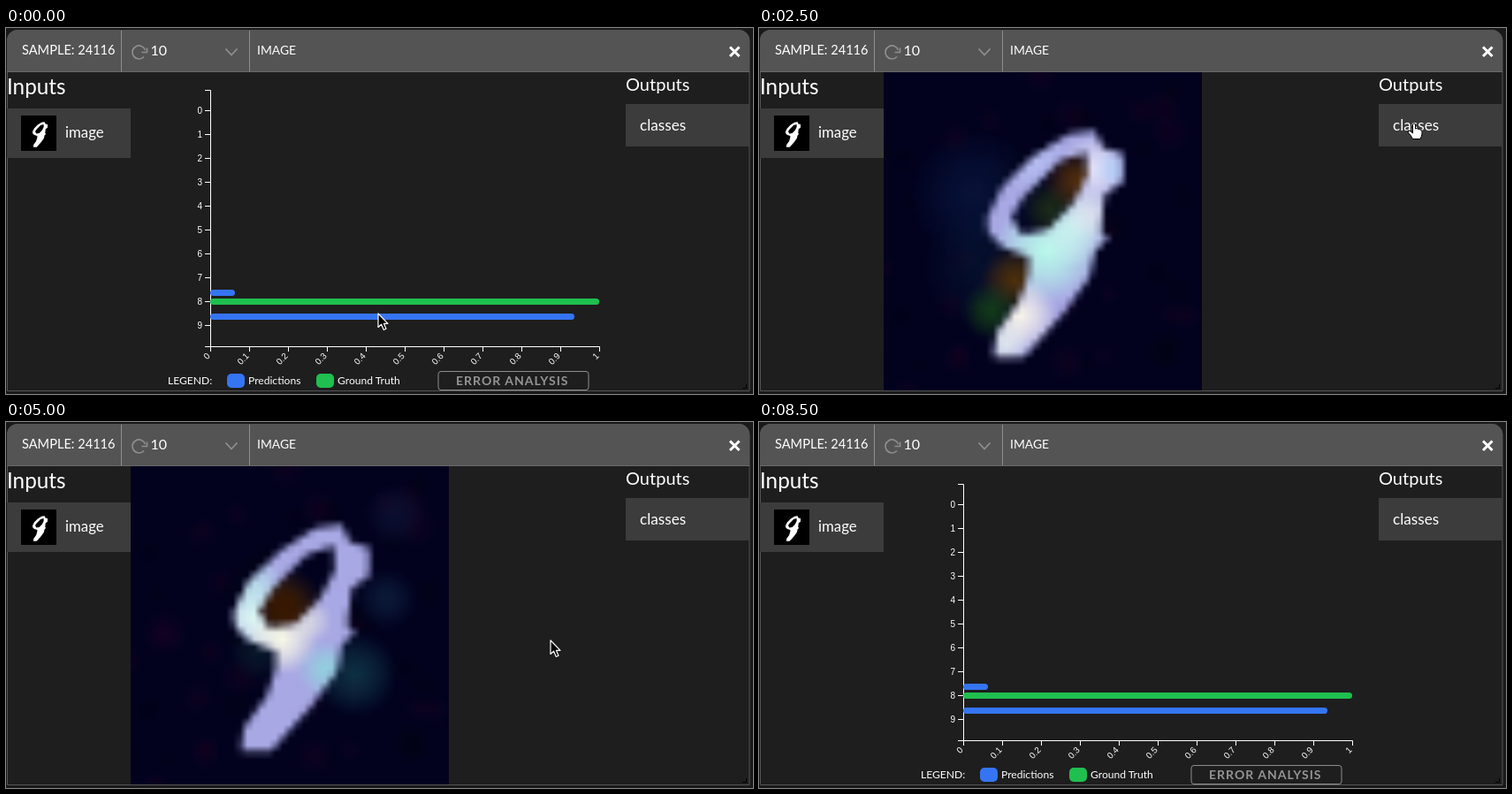
Write an HTML page with a canvas that moves like this. It is 845 px wide and 414 px high and loops after 8.76 s.

```html
<!DOCTYPE html>
<html lang="en">
<head>
<meta charset="utf-8">
<title>Sample analysis</title>
<style>
  html, body { margin: 0; width: 100%; height: 100%; overflow: hidden; background: #191919; }
  svg { position: absolute; left: 0; top: 0; font-family: Lato, sans-serif; fill: #fff; }
  canvas { position: absolute; left: 141px; top: 50px; width: 360px; height: 360px; visibility: hidden; }
  .axis { font: 10px "Liberation Sans", Arial, sans-serif; }
  .line { fill: none; stroke: #fff; }
  .grey { fill: none; stroke: #8e8e8e; }
</style>
</head>
<body>
<svg width="845" height="414">
  <path d="M1.5 410.5V14a12 12 0 0 1 12-11.500H829a12 12 0 0 1 12 11.500V410.500Z" fill="#1e1e1e" stroke="#555"/>
  <path d="M1 49V14A12 12 0 0 1 13 2H829A12 12 0 0 1 841 14V49Z" fill="#545454"/>
  <path d="M1 49.500H841" stroke="#686868"/>
  <path d="M130.500 3V49M275.500 3V49" stroke="#8e8e8e"/>
  <text x="18" y="30" font-size="14.600">SAMPLE: 24116</text>
  <path class="grey" stroke-width="1.700" d="M156 32.500A7.500 7.500 0 1 1 157.500 25M159.500 22.500V27.500H153.500"/>
  <text x="163.500" y="31" font-size="16">10</text>
  <path class="grey" stroke-width="1.800" d="M248.500 23.500L255 30.500L261.500 23.500"/>
  <text x="284" y="30" font-size="13.900">IMAGE</text>
  <path class="line" stroke-width="3" d="M819 21.500L829.500 32M829.500 21.500L819 32"/>

  <text x="1" y="75" font-size="24.300">Inputs</text>
  <rect x="1" y="91" width="140" height="56" fill="#3c3c3c"/>
  <rect x="17" y="99" width="40" height="40" fill="#000"/>
  <svg x="17" y="99" width="40" height="40" viewBox="141 50 360 360">
    <path id="digit" fill-rule="evenodd"/>
  </svg>
  <text x="67" y="124" font-size="16.800">image</text>

  <text x="701" y="71" font-size="20">Outputs</text>
  <clipPath id="button"><rect x="701" y="86" width="140" height="48"/></clipPath>
  <g clip-path="url(#button)">
    <rect x="701" y="86" width="140" height="48" fill="#3c3c3c"/>
    <circle id="ripple"/>
  </g>
  <text x="717" y="115.500" font-size="17.200">classes</text>
  <path d="M833 407.500H837.500V403" fill="none" stroke="#000"/>

  <g id="chart">
    <path class="line" d="M225 70.500H231.500V360.500H225M231.500 366V360.500H671.500V366"/>
    <g id="ticks" class="axis"></g>
    <g fill="#3575f3">
      <rect x="231" y="296" width="28" height="7" rx="3.500"/>
      <rect x="231" y="323" width="412" height="7" rx="3.500"/>
      <rect x="250" y="391" width="20" height="16" rx="5"/>
    </g>
    <g fill="#1fbf50">
      <rect x="231" y="306" width="440" height="7" rx="3.500"/>
      <rect x="351" y="391" width="20" height="16" rx="5"/>
    </g>
    <g font-size="12.100">
      <text x="183" y="403">LEGEND:</text>
      <text x="274" y="403">Predictions</text>
      <text x="375" y="403">Ground Truth</text>
    </g>
    <rect class="grey" x="489" y="388.500" width="170" height="21" rx="3"/>
    <text x="509" y="404" font-size="14" font-weight="700" letter-spacing="1" fill="#949494">ERROR ANALYSIS</text>
  </g>
</svg>
<canvas id="heatA" width="45" height="45"></canvas>
<canvas id="heatB" width="45" height="45"></canvas>
<svg width="845" height="414">
  <g id="cursor" stroke-linejoin="round">
    <path id="arrow" fill="#000" stroke="#fff" stroke-width="1.200" d="M0 0V15.500L3.600 12.200L6.300 18.500L9 17.300L6.400 11.300H11Z"/>
    <path id="hand" fill="#fff" stroke="#000" d="M-1.500 8V1Q0-1.500 1.500 1V6Q3.500 4.500 4.500 6.500Q6.500 5.500 7.200 7.500Q9 7 9 9.500V12Q8.500 14.500 7 17.500H-1.500Q-3-15 -1.500 17.500Q-3 14-6.500 10.500Q-7.500 8-5 8L-1.500 11Z"/>
  </g>
</svg>
<script>
const el = id => document.getElementById(id);
const show = (node, on) => node.style.visibility = on ? 'visible' : 'hidden';
const LOOP = 8760;

const DIGIT = 'M258 215L275 180L310 145L350 119L380 115L389 135L411 141V174L391 188L386 230L395 237' +
  'L380 252L374 282L345 322L300 371L266 372L269 346L295 310L306 275V257L276 247L260 232Z' +
  'M285 213L300 190L340 150L371 139L372 168L355 200L327 229L297 234Z';
el('digit').setAttribute('d', DIGIT);
el('hand').setAttribute('d', 'M-1.500 9V1Q0-1.500 1.500 1V6Q3.500 4.500 4.500 6.500Q6.500 5.500 7.200 7.500' +
  'Q9 7 9 9.500V12Q8.500 14.500 7 17.500H-1.500Q-3 14-6.500 10.500Q-7.500 8-5 8L-1.500 11Z');

let ticks = '';
for (let i = 0; i <= 10; i++) {
  const x = 231.5 + 44 * i, y = 93.5 + 27 * i;
  if (i < 10) ticks += `<path class="line" d="M225 ${y}H231"/><text x="222" y="${y + 3.5}" text-anchor="end">${i}</text>`;
  ticks += `<path class="line" d="M${x} 361V366"/>
    <text transform="translate(${x} 371.6) rotate(-45)" text-anchor="end">${i / 10}</text>`;
}
el('ticks').innerHTML = ticks;

// Each blob is [x, y, radius, "r,g,b", alpha] in stage coordinates.
function drawHeat(id, outside, inside) {
  const ctx = el(id).getContext('2d');
  const blob = ([x, y, r, rgb, alpha]) => {
    const g = ctx.createRadialGradient(x, y, 0, x, y, r);
    g.addColorStop(0, `rgba(${rgb},${alpha})`);
    g.addColorStop(0.5, `rgba(${rgb},${alpha * 0.6})`);
    g.addColorStop(1, `rgba(${rgb},0)`);
    ctx.fillStyle = g;
    ctx.fillRect(x - r, y - r, 2 * r, 2 * r);
  };
  let seed = 7;
  const random = () => (seed = seed * 16807 % 2147483647) / 2147483647;
  ctx.scale(1 / 8, 1 / 8);
  ctx.translate(-141, -50);
  ctx.fillStyle = '#02021f';
  ctx.fillRect(141, 50, 360, 360);
  for (let i = 0; i < 50; i++) {
    blob([141 + 360 * random(), 50 + 360 * random(), 10 + 14 * random(), i % 2 ? '40,0,30' : '0,0,10', 0.3]);
  }
  outside.forEach(blob);
  ctx.clip(new Path2D(DIGIT), 'evenodd');
  ctx.fillStyle = '#a8a8e4';
  ctx.fillRect(141, 50, 360, 360);
  inside.forEach(blob);
}

drawHeat('heatA', [
  [245, 190, 75, '10,30,75', 0.6], [250, 270, 65, '8,30,60', 0.5],
  [330, 205, 34, '30,50,25', 0.9], [359, 173, 36, '85,48,12', 1],
  [290, 285, 38, '80,50,10', 1], [263, 320, 34, '25,75,25', 0.8]
], [
  [325, 252, 60, '185,255,235', 0.95], [355, 225, 45, '205,245,240', 0.9],
  [295, 325, 42, '255,250,235', 0.95], [278, 358, 30, '235,245,240', 0.8],
  [380, 160, 40, '245,245,255', 0.8], [375, 210, 30, '235,235,240', 0.7],
  [402, 160, 22, '175,205,250', 0.8], [310, 150, 40, '190,205,250', 0.6]
]);
drawHeat('heatB', [
  [315, 210, 46, '65,35,5', 1], [315, 210, 26, '55,22,0', 1],
  [395, 285, 48, '20,70,85', 0.7], [430, 200, 34, '18,45,75', 0.6],
  [440, 105, 36, '18,25,60', 0.6], [285, 260, 34, '20,60,60', 0.4], [180, 240, 24, '50,0,45', 0.4]
], [
  [280, 220, 45, '225,255,245', 0.95], [312, 246, 40, '250,250,230', 1],
  [280, 185, 36, '185,235,235', 0.7], [343, 225, 26, '235,235,225', 0.7],
  [362, 280, 32, '140,220,220', 0.8]
]);

const PATH = [
  [0, 421, 323], [2, 422, 322], [9, 590, 205], [14, 642, 166], [15, 642, 166], [16, 670, 152],
  [20, 741, 108], [24, 741, 108], [25, 738, 113], [31, 598, 305], [32, 596, 307], [35, 596, 307],
  [40, 616, 247], [42, 696, 155], [45, 728, 104], [52, 730, 102], [61, 730, 102], [64, 744, 73], [71, 744, 73]
];

function cursorAt(step) {
  const i = PATH.findIndex(key => key[0] > step);
  const [s0, x0, y0] = PATH[i - 1], [s1, x1, y1] = PATH[i];
  const u = (step - s0) / (s1 - s0);
  return [x0 + (x1 - x0) * u, y0 + (y1 - y0) * u];
}

function setRipple(step) {
  const second = step > 40;
  const age = step - (second ? 50.4 : 21);
  const fade = Math.min(1, Math.max(0, (second ? 54 : 24) - step) / 2);
  const attrs = { cx: second ? 730 : 742, cy: second ? 101 : 109, r: Math.max(0, 55 * age), opacity: 0.18 * fade };
  for (const name in attrs) el('ripple').setAttribute(name, attrs[name]);
}

function render(now) {
  const step = Math.floor(Math.floor(now % LOOP / 10) / 12.5);
  const heatA = step >= 3 && step < 22, heatB = step >= 36 && step < 51;
  show(el('heatA'), heatA);
  show(el('heatB'), heatB);
  el('chart').style.display = heatA || heatB ? 'none' : '';
  setRipple(step);
  const [x, y] = cursorAt(step);
  const overButton = x > 701 && y > 86 && y < 134;
  el('cursor').style.display = step < 65 ? '' : 'none';
  el('cursor').setAttribute('transform', `translate(${x} ${y})`);
  show(el('arrow'), !overButton);
  show(el('hand'), overButton);
}

let start;
function tick(now) {
  start ??= now;
  render(now - start);
  requestAnimationFrame(tick);
}
render(0);
requestAnimationFrame(tick);
</script>
</body>
</html>
```
